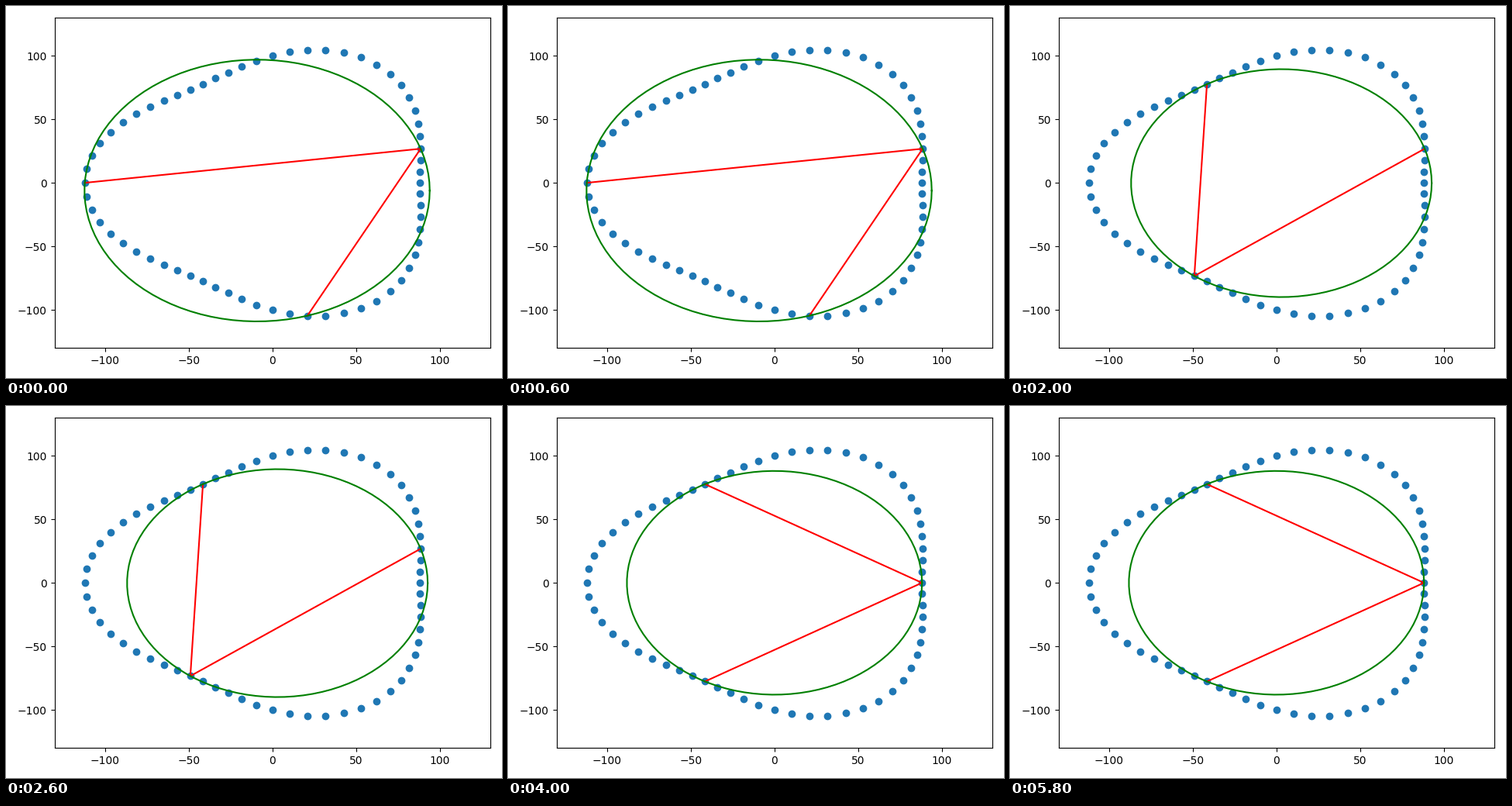
A matplotlib script that plays this animation: 640 px wide and 480 px high, repeating every 7000 ms.

```python
import numpy as np
import matplotlib.pyplot as plt
from matplotlib.animation import FuncAnimation

COUNT = 64
# Each step: three point indices, joined in order by two chords
STEPS = [(32, 3, 50), (32, 3, 42), (21, 42, 3), (42, 21, 0), (21, 0, 43)]
HOLD = 2  # extra ticks on the last step

angle = 2 * np.pi * np.arange(COUNT) / COUNT
radius = 100 - 12 * np.cos(3 * angle)
points = np.column_stack([radius * np.cos(angle), radius * np.sin(angle)])
turn = np.linspace(0, 2 * np.pi, 100)


def circumcircle(tri):
    """Centre and radius of the circle through three points."""
    a, b, c = tri
    system = 2 * np.array([b - a, c - a])
    centre = np.linalg.solve(system, [b @ b - a @ a, c @ c - a @ a])
    return centre, np.hypot(*(a - centre))


fig, ax = plt.subplots(figsize=(6.4, 4.8), dpi=100)
ax.scatter(*points.T)
chords, = ax.plot([], [], color="red")
circle, = ax.plot([], [], color="green")
ax.set_xlim(-130, 130)
ax.set_ylim(-130, 130)
fig.tight_layout()


def update(i):
    tri = points[list(STEPS[min(i, len(STEPS) - 1)])]
    (cx, cy), r = circumcircle(tri)
    chords.set_data(*tri.T)
    circle.set_data(cx + r * np.cos(turn), cy + r * np.sin(turn))
    return chords, circle


anim = FuncAnimation(fig, update, frames=len(STEPS) + HOLD, interval=1000,
                     repeat=True, repeat_delay=0)
plt.show()
```
